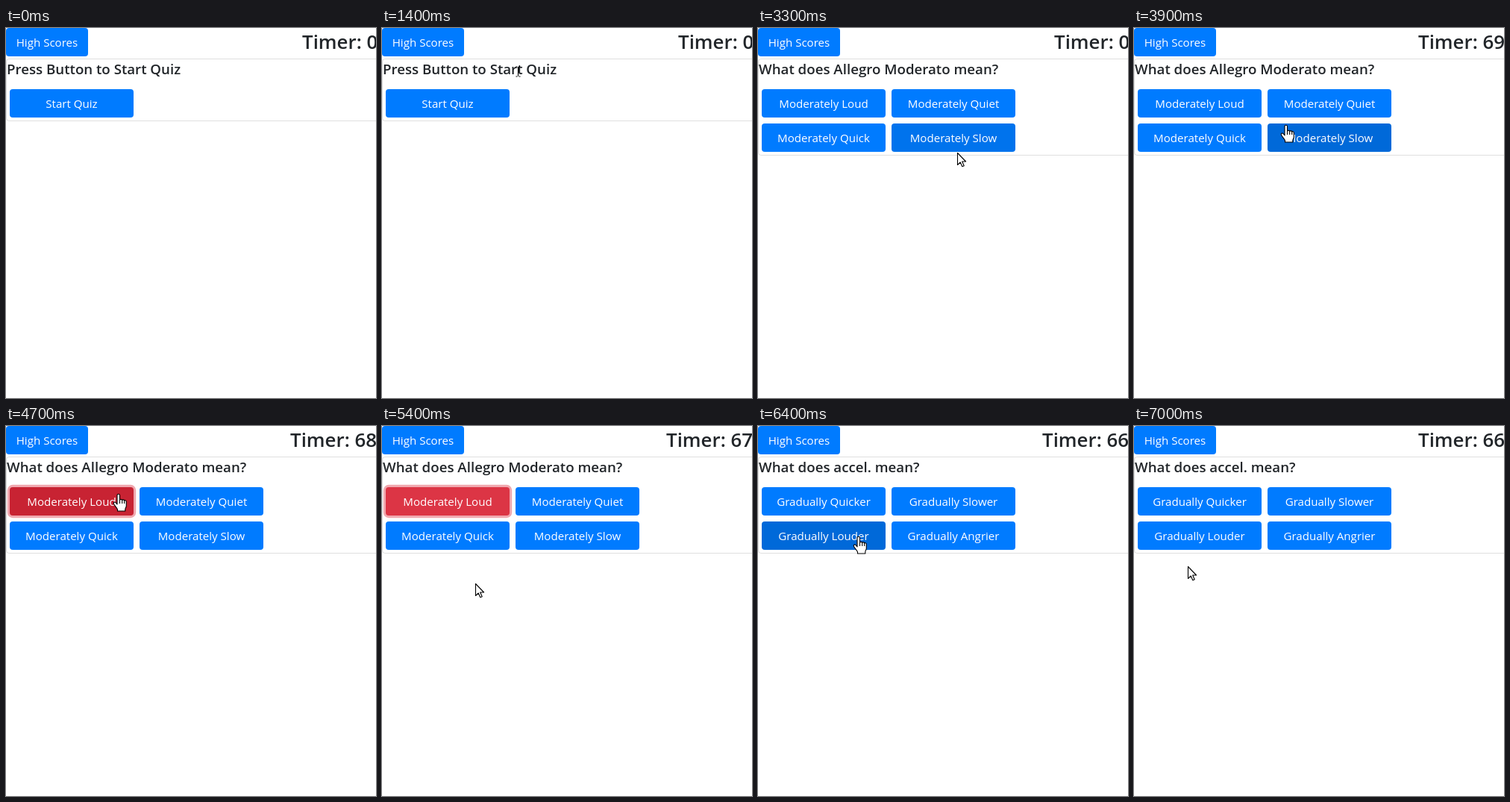
Write an HTML page with a canvas that moves like this. It is 496 px wide and 496 px high and loops after 7200 ms.

```html
<!DOCTYPE html>
<html lang="en">
<head>
<meta charset="utf-8">
<title>Music Quiz</title>
<style>
  html, body { margin: 0; width: 100%; height: 100%; overflow: hidden; background: #fff; }
  #stage { position: relative; width: 496px; height: 496px; overflow: hidden; color: #212529; font-family: "Open Sans", "Noto Sans", sans-serif; }
  #stage > * { position: absolute; box-sizing: border-box; white-space: pre; }
  .btn { height: 38px; border-radius: 4px; background: #007bff; color: #fff; font-size: 15.1px; line-height: 38px; text-align: center; }
  #scores { left: 0; top: 0; width: 110px; }
  #timer { top: 1px; font-size: 25.9px; font-weight: 600; line-height: 34px; }
  #card { left: 0; top: 41px; width: 620px; border: 1px solid rgba(0, 0, 0, .125); border-radius: 4px; }
  #title { left: 1px; top: 43px; font-size: 18.7px; font-weight: 600; line-height: 24px; }
  #pointer { left: 0; top: 0; width: 496px; height: 496px; }
</style>
</head>
<body>
<div id="stage">
  <div id="scores" class="btn">High Scores</div>
  <div id="timer"></div>
  <div id="card"></div>
  <div id="title"></div>
  <canvas id="pointer"></canvas>
</div>
<script>
const LOOP = 7200, STEP = 100, FADE = 150;
const START = 2400, WRONG = 4450, NEXT = 6400;

const screens = [
  { title: "Press Button to Start Quiz", labels: ["Start Quiz"] },
  { title: "What does Allegro Moderato mean?",
    labels: ["Moderately Loud", "Moderately Quiet", "Moderately Quick", "Moderately Slow"] },
  { title: "What does accel. mean?",
    labels: ["Gradually Quicker", "Gradually Slower", "Gradually Louder", "Gradually Angrier"] }
];

// Pointer path: time, x, y
const path = [
  [700, 488, 62], [1400, 182, 58], [1600, 182, 58], [2200, 134, 94],
  [3000, 134, 94], [3230, 264, 166], [3300, 267, 167], [3500, 262, 170],
  [3700, 240, 156], [4200, 151, 91], [4750, 151, 91], [5100, 128, 196],
  [5400, 125, 211], [5550, 125, 211], [6050, 135, 148], [6400, 135, 148],
  [6800, 72, 188], [7200, 72, 188]
];

const $ = id => document.getElementById(id);
const stage = $("stage"), title = $("title"), timer = $("timer"), card = $("card");
const canvas = $("pointer"), ctx = canvas.getContext("2d");
const ratio = window.devicePixelRatio || 1;
canvas.width = canvas.height = 496 * ratio;

const arrow = new Path2D("M.5 .5V16.5L4.2 13L6.8 18.8L9.2 17.8L6.7 12H11.6Z");
const hand = new Path2D("M-2 14V2a1.75 1.75 0 0 1 3.5 0V8.5c0-1.5 3.2-1.5 3.2 .3" +
  "c0-1.3 3-1.3 3 .6c0-1.2 2.6-1 2.6 .9V16c0 2-1.5 3-1.5 5V23H-1.5V21" +
  "C-2.5 18-6 15.5-6.8 12.6C-7 10.8-4.5 10.6-3.6 12Z");
const knuckles = new Path2D("M1.5 8.5V13M4.7 9V13M7.7 9.5V13");
const beam = new Path2D("M-3 -6.5H-1M1 -6.5H3M0 -6V6M-3 6.5H-1M1 6.5H3");

const buttons = [0, 1, 2, 3].map(i => {
  const el = document.createElement("div");
  const x = 5 + (i % 2) * 174, y = 82 + (i >> 1) * 46;
  el.className = "btn";
  el.style.cssText = `left:${x}px;top:${y}px;width:166px`;
  stage.insertBefore(el, canvas);
  return { el, x, y };
});

function pointerAt(t) {
  if (t < path[0][0]) return null;
  const i = Math.max(1, path.findIndex(p => p[0] >= t));
  const [t0, x0, y0] = path[i - 1], [t1, x1, y1] = path[i];
  const k = (t - t0) / (t1 - t0);
  return { x: x0 + (x1 - x0) * k, y: y0 + (y1 - y0) * k };
}

const isOver = (b, p) => p && p.x >= b.x && p.x < b.x + 166 && p.y >= b.y && p.y < b.y + 38;

// Averaging the recent hover state gives the linear colour fade.
function hoverLevel(b, t) {
  let n = 0;
  for (let d = 0; d < FADE; d += 10) n += isOver(b, pointerAt(t - d)) ? 1 : 0;
  return n * 10 / FADE;
}

const mix = (a, b, k) => a.map((v, i) => v + (b[i] - v) * k);
const clamp = v => Math.min(1, Math.max(0, v));

function drawPointer(p, kind) {
  ctx.setTransform(ratio, 0, 0, ratio, 0, 0);
  ctx.clearRect(0, 0, 496, 496);
  if (!p) return;
  ctx.translate(Math.round(p.x), Math.round(p.y));
  ctx.strokeStyle = "#000";
  ctx.fillStyle = "#fff";
  ctx.lineWidth = 1.1;
  ctx.lineJoin = "round";
  if (kind === "text") {
    ctx.translate(.5, .5);
    ctx.stroke(beam);
    return;
  }
  const shape = kind === "hand" ? hand : arrow;
  ctx.fill(shape);
  ctx.stroke(shape);
  if (kind === "hand") ctx.stroke(knuckles);
}

function render(t) {
  const page = t < START ? 0 : t < NEXT ? 1 : 2;
  const { title: heading, labels } = screens[page];
  title.textContent = heading;
  card.style.height = (page ? 130 : 84) + "px";

  const ticks = Math.floor((t - START) / 1000);
  const left = ticks > 0 ? 70 - ticks : 0;
  timer.textContent = "Timer: " + left;
  timer.style.left = (left ? 381 : 397) + "px";

  const p = pointerAt(t);
  let kind = "arrow";
  if (p && p.y >= 43 && p.y < 67 && p.x < title.offsetWidth) kind = "text";

  buttons.forEach((b, i) => {
    const shown = i < labels.length;
    b.el.style.display = shown ? "" : "none";
    if (!shown) return;
    b.el.textContent = labels[i];
    if (isOver(b, p)) kind = "hand";
    const hover = hoverLevel(b, t);
    const wrong = page === 1 && i === 0 ? clamp((t - WRONG) / FADE) : 0;
    const blue = mix([0, 123, 255], [0, 105, 217], hover);
    const red = mix([220, 53, 69], [200, 35, 51], hover);
    b.el.style.background = `rgb(${mix(blue, red, wrong).map(Math.round)})`;
    b.el.style.boxShadow = wrong ? `0 0 0 ${3.2 * wrong}px rgba(225,83,97,.5)` : "none";
  });
  drawPointer(p, kind);
}

const begin = performance.now();
let last = -1;
function frame() {
  const elapsed = (performance.now() - begin) % LOOP;
  const t = Math.floor(elapsed / STEP) * STEP;
  if (t !== last) render(last = t);
  requestAnimationFrame(frame);
}
frame();
</script>
</body>
</html>
```
